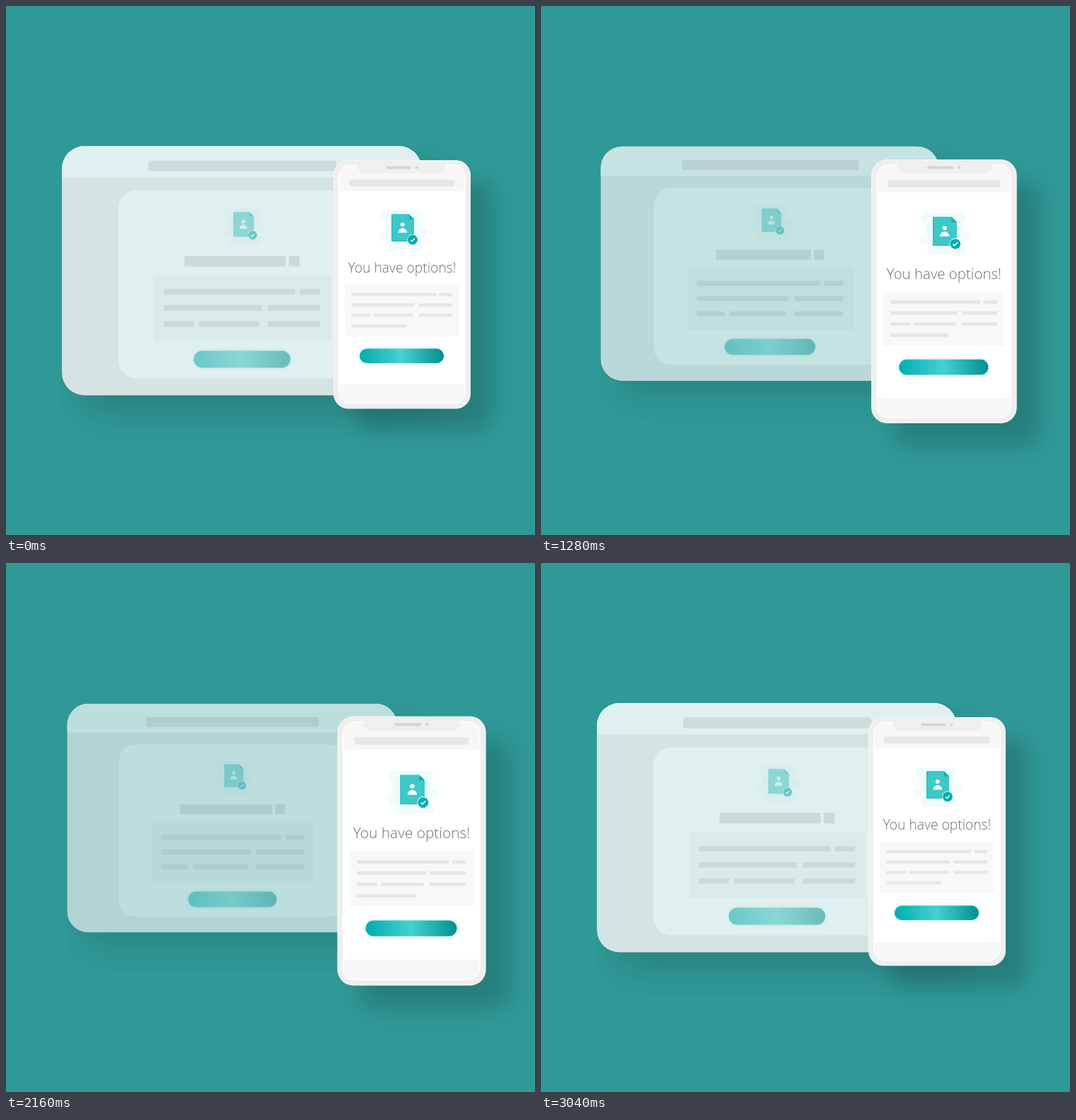
An HTML page with a canvas that plays this animation: 748 by 748 pixels, repeating every 3.56 s.

```html
<!DOCTYPE html>
<html lang="en">
<head>
<meta charset="utf-8">
<title>You have options!</title>
<style>
html, body { margin: 0; width: 100%; height: 100%; overflow: hidden; background: #2f9997; }
canvas { display: block; width: 748px; height: 748px; }
</style>
</head>
<body>
<canvas id="stage" width="748" height="748"></canvas>
<script>
const SIZE = 748, LOOP = 3560, STEP = 40;
const stage = document.getElementById('stage').getContext('2d');
const layer = document.createElement('canvas');
layer.width = layer.height = SIZE;
const back = layer.getContext('2d');

const VIVID = {
  blob: '#f0fbfb', page: '#3ec8c7', edge: '#25b7b6', fold: '#12aeae',
  person: '#ffffff', badge: '#05adad', ring: '#ffffff',
  button: ['#00aeae', '#47d0d1', '#008f90'], glow: 'rgba(0,174,174,.25)'
};
const PALE = {
  blob: '#f8fcfc', page: '#9ce2e1', edge: '#8cd8d7', fold: '#80d2d1',
  person: '#f4fafa', badge: '#74d0cf', ring: '#f4fafa',
  button: ['#74d1d0', '#9be3e1', '#74c2c1'], glow: 'rgba(90,200,200,.25)'
};

// Boxes are given by their edges: left, top, right, bottom.
function box(c, l, t, r, b, fill, radius = 0) {
  c.beginPath();
  c.roundRect(l, t, r - l, b - t, radius);
  c.fillStyle = fill;
  c.fill();
}

function disc(c, x, y, radius, fill) {
  c.beginPath();
  c.arc(x, y, radius, 0, Math.PI * 2);
  c.fillStyle = fill;
  c.fill();
}

function poly(c, points, fill) {
  c.beginPath();
  points.forEach(([x, y]) => c.lineTo(x, y));
  c.closePath();
  c.fillStyle = fill;
  c.fill();
}

function row(c, y, h, spans) {
  spans.forEach(([l, r]) => box(c, l, y - h / 2, r, y + h / 2, '#e6e6e6'));
}

function withShadow(c, color, offset, blur, scale, draw) {
  c.save();
  c.shadowColor = color;
  c.shadowOffsetX = c.shadowOffsetY = offset * scale;
  c.shadowBlur = blur * scale;
  draw();
  c.restore();
}

function scaleAbout(c, x, y, s) {
  c.translate(x, y);
  c.scale(s, s);
  c.translate(-x, -y);
}

function button(c, l, t, r, b, look, scale) {
  const mid = (t + b) / 2, h = b - t;
  const g = c.createLinearGradient(l, mid + h * 0.25, r, mid - h * 0.25);
  look.button.forEach((color, i) => g.addColorStop(i / 2, color));
  withShadow(c, look.glow, 0, 5, scale, () => box(c, l, t, r, b, g, h / 2));
}

function icon(c, x, y, s, look) {
  c.save();
  c.translate(x, y);
  c.scale(s, s);
  box(c, -16, -5.5, 43.5, 8.5, look.blob, 7);
  box(c, -10, 6, 40, 26, look.blob, 6);
  box(c, 5, 18.5, 50, 31.5, look.blob, 6.5);
  box(c, -18, 25, 25, 38, look.blob, 6.5);
  box(c, -8, 37, 44, 50.5, look.blob, 6.5);

  poly(c, [[0, 0], [25, 0], [32, 7], [32, 38.5], [0, 38.5]], look.edge);
  poly(c, [[1.2, 0], [25, 0], [32, 7], [32, 37.5], [1.2, 37.5]], look.page);
  poly(c, [[25, 0], [32, 7], [25, 7]], look.fold);

  disc(c, 15.8, 14.6, 2.9, look.person);
  c.beginPath();
  c.moveTo(9.6, 26);
  c.bezierCurveTo(9.6, 17.5, 22, 17.5, 22, 26);
  c.closePath();
  c.fill();

  disc(c, 30, 36, 7.7, look.ring);
  disc(c, 30, 36, 6.9, look.badge);
  c.beginPath();
  c.moveTo(27, 36.2);
  c.lineTo(29.1, 38.2);
  c.lineTo(33, 33.9);
  c.strokeStyle = look.ring;
  c.lineWidth = 1.5;
  c.stroke();
  c.restore();
}

function drawDesktop(c, s) {
  c.clearRect(0, 0, SIZE, SIZE);
  c.save();
  scaleAbout(c, 170, 211, s);

  c.save();
  c.beginPath();
  c.rect(78, 197, 558, 415);
  c.clip();
  withShadow(c, 'rgba(0,0,0,.18)', 24, 50, s,
    () => box(c, 79, 198, 587.5, 550.5, '#f1f1f1', 32));
  c.restore();

  box(c, 79, 198, 587.5, 242.5, '#ffffff', [32, 32, 0, 0]);
  box(c, 201, 218.5, 467.3, 233.5, '#ebe6e6', 4);
  box(c, 159, 260.5, 508.5, 526.5, '#ffffff', 25);
  icon(c, 321.5, 291.5, 0.905, PALE);
  row(c, 360.7, 15, [[252.5, 395.5], [399.7, 415]]);
  box(c, 209.3, 381.5, 459.3, 473.5, '#f8f8f8');
  row(c, 404, 7.4, [[223.5, 409], [415.5, 444]]);
  row(c, 426.7, 7.4, [[223.5, 361.5], [370.5, 444]]);
  row(c, 449.6, 7.4, [[223.5, 265.5], [273, 358], [370.5, 444]]);
  button(c, 265.5, 487.5, 402, 511.5, PALE, s);
  c.restore();
}

function drawPhone(c, s) {
  c.save();
  scaleAbout(c, 397, 232.5, s);

  withShadow(c, 'rgba(0,0,0,.18)', 30, 30, s,
    () => box(c, 463, 218, 657, 569.5, '#f8f8f8', 21));
  box(c, 463.8, 218.8, 656.2, 568.7, '#efefef', 20);
  box(c, 470, 224.7, 649.7, 562.5, '#ffffff', 16);
  box(c, 471.3, 226, 648.4, 561.2, '#f7f7f7', 15);
  box(c, 471.3, 262, 648.4, 535.3, '#ffffff');

  box(c, 497.5, 224, 623, 236.5, '#efefef', [0, 0, 9, 9]);
  box(c, 537.5, 226.8, 572.3, 230.5, '#d4d4d4', 1.8);
  disc(c, 580.5, 228.6, 2, '#d4d4d4');
  box(c, 485, 245.3, 635, 255.2, '#ebe6e6', 3);

  icon(c, 545, 294.5, 1, VIVID);

  c.font = '300 19.3px "Open Sans", "Noto Sans", sans-serif';
  c.textAlign = 'center';
  c.fillStyle = '#6e6e6e';
  c.fillText('You have options!', 560, 377);

  box(c, 479, 393.7, 640.5, 466.5, '#f8f8f8');
  row(c, 408, 4.4, [[488.5, 608.5], [612.5, 631]]);
  row(c, 422.6, 4.4, [[488.5, 578], [583.5, 631]]);
  row(c, 437.4, 4.4, [[488.5, 515.5], [520, 575.3], [583.5, 631]]);
  row(c, 452.3, 4.4, [[488.5, 566]]);
  button(c, 500, 484.5, 619, 505, VIVID, s);
  c.restore();
}

function ease(t, start, length) {
  const u = Math.min(1, Math.max(0, (t - start) / length));
  return u < 0.5 ? 2 * u * u : 1 - 2 * (1 - u) ** 2;
}

function render(t) {
  const p = t < 1815 ? ease(t, 592, 1236) : 1 - ease(t, 1810, 1212);
  drawDesktop(back, 1 - 0.1 * p);
  stage.fillStyle = '#2f9997';
  stage.fillRect(0, 0, SIZE, SIZE);
  stage.globalAlpha = 0.85 - 0.205 * p;
  stage.drawImage(layer, 0, 0);
  stage.globalAlpha = 1;
  drawPhone(stage, 1 + 0.1 * p);
}

const begin = performance.now();
function tick() {
  const t = (performance.now() - begin) % LOOP;
  render(Math.floor(t / STEP) * STEP);
  requestAnimationFrame(tick);
}
tick();
</script>
</body>
</html>
```
